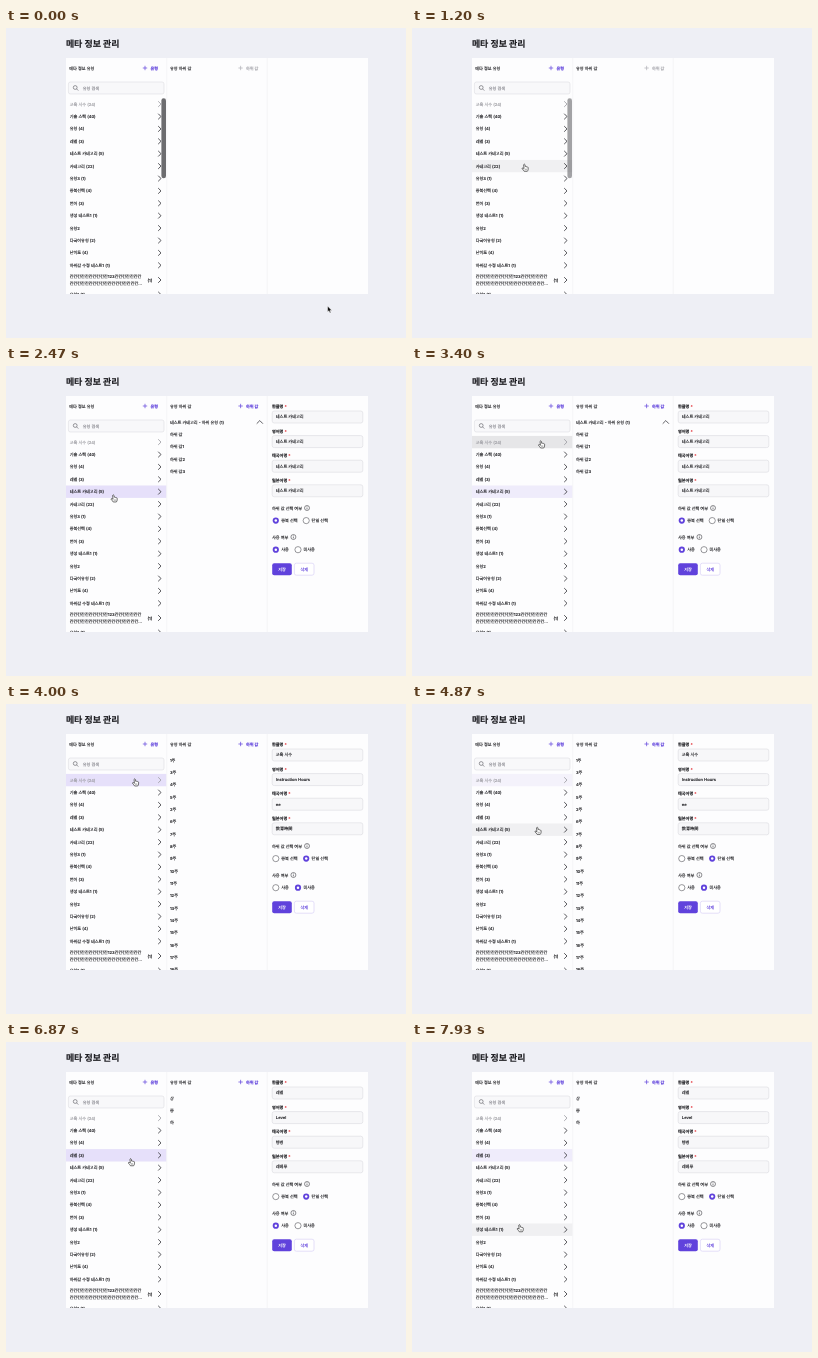
An HTML page for the animation above (8000 ms loop, 400 by 310 pixels).

```html
<!DOCTYPE html>
<html lang="ko">
<head>
<meta charset="utf-8">
<title>메타 정보 관리</title>
<style>
  html, body { margin: 0; width: 100%; height: 100%; overflow: hidden; background: #eeeff5; }
  svg { display: block; width: 400px; height: 310px; }
  text {
    font: 500 4.15px Inter, "Noto Sans CJK KR", sans-serif;
    text-rendering: geometricPrecision;
    fill: currentColor; stroke: currentColor; stroke-width: 0.13;
    white-space: pre;
  }
</style>
</head>
<body>
<svg id="stage" viewBox="0 0 400 310">
  <clipPath id="clip"><rect x="60" y="30" width="302" height="236"/></clipPath>
</svg>
<script>
const LOOP = 8000, VIOLET = '#6042dc', GREY = '#9c9ca2', INK = '#222226';
const ROW = 12.4, TOP = 69.9;
const stage = document.getElementById('stage');

function add(parent, tag, attrs = {}, content) {
  const el = document.createElementNS('http://www.w3.org/2000/svg', tag);
  for (const k in attrs) el.setAttribute(k, attrs[k]);
  if (content !== undefined) el.textContent = content;
  parent.append(el);
  return el;
}
const group = (parent, attrs) => add(parent, 'g', attrs);
const rect = (parent, x, y, width, height, fill, more) =>
  add(parent, 'rect', { x, y, width, height, fill, ...more });
const line = (parent, d, stroke, width = 0.8) =>
  add(parent, 'path', { d, stroke, fill: 'none', 'stroke-width': width });
const dot = (parent, cx, cy, r, attrs) => add(parent, 'circle', { cx, cy, r, ...attrs });
// y is the middle of the text line
const label = (parent, x, y, str, color = INK, css = '') =>
  add(parent, 'text', { x, y: y + 1.5, style: `color:${color};${css}` }, str);
const show = (el, on) => { el.style.display = on ? '' : 'none'; };
const rowY = i => TOP + ROW * (i + 0.5);

function plusLabel(parent, x, str, color) {
  line(parent, `M${x - 2.2} 40h4.4M${x} 37.8v4.4`, color, 0.7);
  label(parent, x + 5.4, 40, str, color, 'font-weight:700');
}

// Page and panel
label(stage, 59.9, 17.8, '메타 정보 관리', '#1c1c20', 'font-size:8.95px;font-weight:700');
const panel = group(stage, { 'clip-path': 'url(#clip)' });
rect(panel, 60, 30, 302, 236, '#fdfdfe');
const selBar = rect(panel, 60, 0, 100.5, ROW, '#efecfb');
const hoverBar = rect(panel, 60, 0, 100.5, ROW, '#f1f1f3');
line(panel, 'M160.7 30V266M261.2 30V266', '#f2f2f4', 0.7);

// First column
label(panel, 63.3, 40, '메타 정보 유형');
plusLabel(panel, 139, '유형', VIOLET);
rect(panel, 62.4, 54, 95.6, 12, '#f8f8fa', { rx: 2, stroke: '#dcdce1', 'stroke-width': 0.6 });
dot(panel, 69.2, 59.5, 1.9, { fill: 'none', stroke: '#55555c', 'stroke-width': 0.6 });
line(panel, 'M70.6 60.9l1.7 1.7', '#55555c', 0.6);
label(panel, 76.8, 60, '유형 검색', '#88888f');

const types = ['교육 시수 (24)', '기술 스택 (40)', '유형 (4)', '레벨 (3)', '테스트 카테고리 (5)',
  '카테고리 (22)', '유형3 (1)', '중복선택 (4)', '언어 (3)', '생성 테스트1 (1)', '유형2',
  '다국어유형 (2)', '난이도 (4)', '하위값 수정 테스트1 (1)'];
function chevron(y, color) {
  line(panel, `M152.2 ${y - 2.8}l2.8 2.8l-2.8 2.8`, color, 0.85);
}
types.forEach((name, i) => {
  const y = rowY(i);
  label(panel, 63.7, y, name, i ? INK : GREY);
  chevron(y, i ? '#38383d' : GREY);
});
label(panel, 63.7, 248.7, '간'.repeat(10) + '123' + '간'.repeat(7));
label(panel, 63.7, 255, '간'.repeat(18) + '...');
label(panel, 141.6, 252, '(1)');
chevron(252, '#38383d');
label(panel, 63.7, 266.6, '유형1 (1)');
chevron(266.6, '#38383d');
const scrollbar = rect(panel, 155.4, 70.3, 4.6, 80, '#6c6c6f', { rx: 2.3 });

// Second column header
label(panel, 164, 40, '유형 하위 값');
const addOff = group(panel), addOn = group(panel);
plusLabel(addOff, 234.6, '하위 값', '#b0b0b6');
plusLabel(addOn, 234.6, '하위 값', VIOLET);

// Detail views
function info(parent, x, y) {
  dot(parent, x, y, 2.5, { fill: 'none', stroke: '#333338', 'stroke-width': 0.55 });
  line(parent, `M${x} ${y - 0.4}v1.8M${x} ${y - 1.5}v.6`, '#333338', 0.6);
}
function radio(parent, x, y, str, on) {
  dot(parent, x, y, 3.1, on ? { fill: VIOLET }
    : { fill: '#fff', stroke: '#55555c', 'stroke-width': 0.6 });
  if (on) dot(parent, x, y, 1.25, { fill: '#fff' });
  label(parent, x + 5.4, y, str);
}
function button(parent, x, str, fill, color, border) {
  rect(parent, x, 197.2, 19.6, 12, fill, { rx: 2, stroke: border, 'stroke-width': 0.6 });
  label(parent, x + 9.8, 203.2, str, color, 'text-anchor:middle');
}
function makeView({ items, fields, multi, used, tree }) {
  const g = group(panel);
  items.forEach((str, i) => label(g, 163.9, 56.2 + i * 12.34, str));
  if (tree) line(g, 'M250.7 57.7l3.1-3.1l3.1 3.1', '#38383d', 0.8);
  ['한글명', '영어명', '태국어명', '일본어명'].forEach((name, i) => {
    const y = 40.7 + i * 24.6;
    const t = label(g, 266, y, name + ' ', INK, 'font-weight:700');
    add(t, 'tspan', { style: 'color:#e5484d' }, '*');
    rect(g, 266.2, y + 4.3, 90.6, 12, '#f7f7f9', { rx: 2, stroke: '#dadadf', 'stroke-width': 0.6 });
    label(g, 269.8, y + 10.2, fields[i]);
  });
  label(g, 266, 142, '하위 값 선택 여부');
  info(g, 301, 142);
  radio(g, 269.8, 154.6, '중복 선택', multi);
  radio(g, 300.2, 154.6, '단일 선택', !multi);
  label(g, 266, 171, '사용 여부');
  info(g, 287.4, 171);
  radio(g, 269.8, 183.7, '사용', used);
  radio(g, 292, 183.7, '미사용', !used);
  button(g, 266.2, '저장', VIOLET, '#fff', 'none');
  button(g, 288.4, '삭제', '#fff', VIOLET, '#d3cbf5');
  return g;
}
const weeks = [1, 3, 4, 5, 2, ...Array.from({ length: 13 }, (_, i) => i + 6)];
const views = [
  { items: ['테스트 카테고리 - 하위 유형 (1)', '하위 값', '하위 값1', '하위 값2', '하위 값3'],
    fields: Array(4).fill('테스트 카테고리'), multi: true, used: true, tree: true },
  { items: weeks.map(n => n + '주'),
    fields: ['교육 시수', 'Instruction Hours', 'ee', '教育時間'], multi: false, used: false },
  { items: ['상', '중', '하'],
    fields: ['레벨', 'Level', '렝벵', '레베루'], multi: false, used: true },
].map(makeView);

// Pointers, with the tip at 0,0
const arrow = group(stage), hand = group(stage);
add(arrow, 'path', { d: 'M0 0V6.1L1.4 4.8L2.4 7.1L3.5 6.6L2.5 4.4H4.4Z',
  fill: '#111', stroke: '#fff', 'stroke-width': 0.5 });
const palm = group(hand, { transform: 'translate(0 -.4) scale(.92)' });
add(palm, 'path', { d: 'M-.7 .6Q0-.6 .7 .6L1.1 2.7Q1.7 2.1 2.2 2.9Q2.9 2.4 3.3 3.2Q4.1 3 4.2 3.9V5.6Q4 7 3.3 7.8H-.1Q-.9 6.5-2.3 5Q-2.6 3.9-1.3 4.2L-.3 4.9Z',
  fill: '#fff', stroke: '#222', 'stroke-width': 0.7, 'stroke-linejoin': 'round' });
line(palm, 'M1 5v1.6M2.2 5v1.6', '#222', 0.4);

// time, x, y of the pointer tip
const path = [
  [0, 321.5, 278], [200, 321.5, 278], [670, 120, 229], [1000, 120, 229], [1200, 112.3, 136.5],
  [1530, 107, 130], [1700, 107, 130], [1760, 107.3, 129.2], [2670, 107.3, 129.2],
  [3200, 128.7, 75.2], [4200, 128.7, 75.2], [4340, 126, 126.5], [4470, 126, 126.5],
  [4870, 125.2, 123.6], [5270, 125, 119.8], [5470, 124.6, 117], [7400, 124.6, 117],
  [7660, 113, 197], [7930, 107.4, 183], [8000, 107.4, 183],
];
// time, selected row, shown view
const states = [
  [0, -1, -1], [2070, 4, -1], [2200, 4, 0], [3470, 0, 0], [3600, 0, 1], [5530, 3, 1], [5670, 3, 2],
];

const ease = p => p * p * (3 - 2 * p);
function pointerAt(t) {
  const i = path.findIndex(k => k[0] > t);
  const [t0, x0, y0] = path[i - 1], [t1, x1, y1] = path[i];
  const p = ease((t - t0) / (t1 - t0));
  return [x0 + (x1 - x0) * p, y0 + (y1 - y0) * p];
}

function draw(t) {
  const [x, y] = pointerAt(t);
  const [, sel, view] = states.findLast(s => s[0] <= t);
  const inList = x > 60 && x < 160 && y > TOP && y < 266;
  const over = inList ? Math.min(13, Math.floor((y - TOP) / ROW)) : -1;

  show(arrow, !inList);
  show(hand, inList);
  (inList ? hand : arrow).setAttribute('transform', `translate(${x} ${y})`);

  show(selBar, sel >= 0);
  selBar.setAttribute('y', TOP + sel * ROW);
  selBar.setAttribute('fill', sel === over ? '#e6e0fa' : sel ? '#efecfb' : '#f4f2fb');
  show(hoverBar, over >= 0 && over !== sel);
  hoverBar.setAttribute('y', TOP + over * ROW);
  hoverBar.setAttribute('fill', over ? '#f0f0f2' : '#e6e6e8');

  scrollbar.setAttribute('opacity', Math.max(0, Math.min(1, 1 - (t - 1050) / 400)));
  show(addOff, view < 0);
  show(addOn, view >= 0);
  views.forEach((v, i) => show(v, i === view));
}

const start = performance.now();
function tick() {
  draw((performance.now() - start) % LOOP);
  requestAnimationFrame(tick);
}
tick();
</script>
</body>
</html>
```
